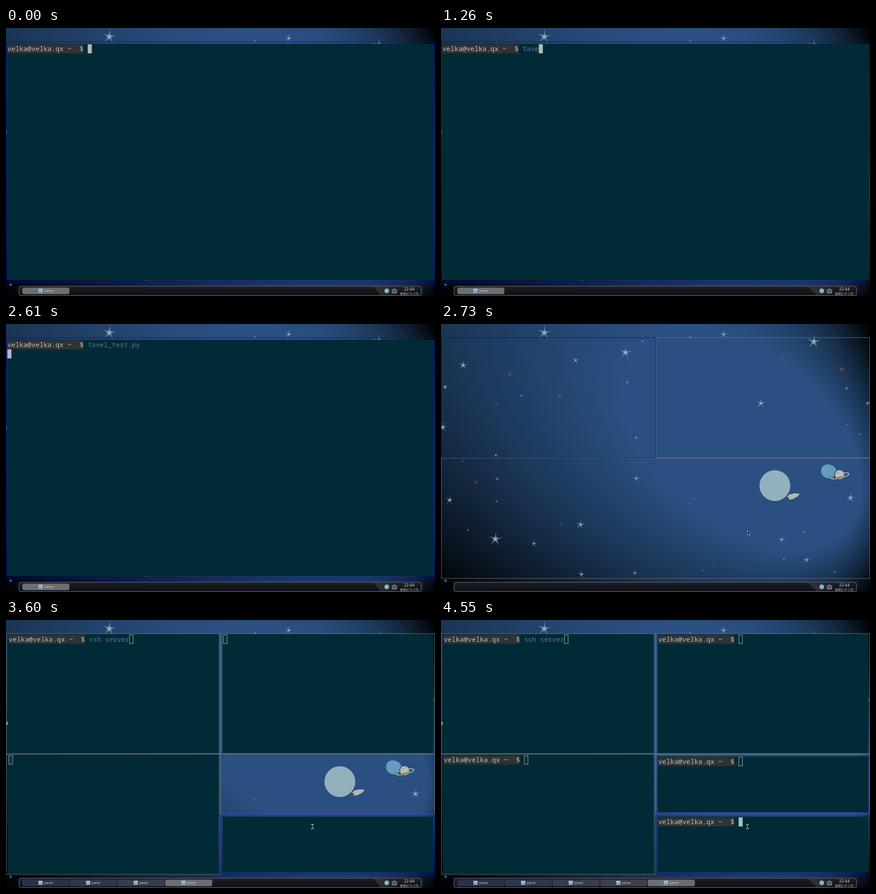
An HTML page for the animation above (9910 ms loop, 947 by 592 pixels).

```html
<!DOCTYPE html>
<html lang="en">
<head>
<meta charset="utf-8">
<title>Tiling desktop</title>
<style>
html, body { margin: 0; width: 100%; height: 100%; overflow: hidden; background: #000; }
svg { display: block; width: 100vw; height: 100vh; }
text { white-space: pre; }
.term { font: 14.78px "Noto Sans Mono", monospace; }
.small { font: 7px "DejaVu Sans", sans-serif; fill: #d0d2d4; }
.clock { font: 8px "DejaVu Sans", sans-serif; fill: #dcdcdc; }
.date { font: 6.2px "Noto Sans CJK SC", "Noto Sans CJK", sans-serif; fill: #c8cacc; }
</style>
</head>
<body>
<svg viewBox="0 0 947 592">
  <defs>
    <radialGradient id="sky" gradientUnits="userSpaceOnUse" cx="-1.81" cy=".58" r="3.24" fx=".81" fy="-.26"
      gradientTransform="translate(670 255) rotate(40) scale(300 185)">
      <stop offset=".309" stop-color="#2a5082"/>
      <stop offset=".6" stop-color="#193250"/>
      <stop offset="1" stop-color="#000204"/>
    </radialGradient>
    <radialGradient id="glow">
      <stop stop-color="#dce8ea" stop-opacity=".7"/>
      <stop offset="1" stop-color="#9db8cc" stop-opacity="0"/>
    </radialGradient>
    <linearGradient id="bar" x2="0" y2="1">
      <stop stop-color="#1b1e25"/>
      <stop offset="1" stop-color="#0d0f14"/>
    </linearGradient>
    <linearGradient id="wedge">
      <stop stop-color="#34363b"/>
      <stop offset=".6" stop-color="#34363b" stop-opacity="0"/>
    </linearGradient>
    <filter id="soft" x="-30%" y="-30%" width="160%" height="160%"><feGaussianBlur stdDeviation=".7"/></filter>
  </defs>
  <rect width="947" height="592" fill="url(#sky)"/>
  <g id="stars"></g>
  <g id="scenery">
    <circle cx="737" cy="357" r="34" fill="#93b0bd"/>
    <path d="M764 382l4-5 12-3 12 1-5 6-11 6-9 1 2-4z" fill="#b4b9b2"/>
    <path d="M839 325q0-14 15-15 14 1 19 13l-8 18q-24 2-26-16z" fill="#679bbd"/>
    <circle cx="880" cy="333" r="12" fill="#233f5e"/>
    <circle cx="880" cy="333" r="10.5" fill="#b9bdb5"/>
    <path d="M873 329l13-4M873 340l15-4" stroke="#8c918e" fill="none"/>
    <g transform="rotate(-13 880 334)" fill="none">
      <path d="M871 331a21 5 0 1 0 18 0" stroke="#1d2c3a" stroke-width="3.600"/>
      <path d="M871 331a21 5 0 1 0 18 0" stroke="#c0c4bc" stroke-width="2"/>
    </g>
  </g>
  <g id="windows"></g>
  <rect x="29" y="570.5" width="888" height="20.5" rx="4" fill="url(#bar)" stroke="#555960" stroke-width="1.6"/>
  <path d="M812 571.5H916V590H828z" fill="url(#wedge)"/>
  <circle cx="840.5" cy="580.5" r="5.3" fill="#86b4cf"/>
  <path d="M852.5 578.5h10v7h-10zM855 576.5h5M854 581h3M858.5 581h3M854 583.5h7" fill="none" stroke="#b9bbbd"/>
  <text class="clock" x="878.7" y="580">22:44</text>
  <text class="date" x="870" y="588.5">星期日 01 六月</text>
  <g id="tasks"></g>
</svg>
<script>
const LOOP = 9910, COL = 8.87, ROW = 20;
const PROMPT = 'velka@velka.qx ~  $';
const COMMAND = 'tavel_test.py ';
const $ = id => document.getElementById(id);

// Stars: x, y, radius
const SHARP = [624,23,9, 550,29,4, 297,80,8, 411,129,5, 431,251,5, 121,290,6, 706,175,11, 895,142,6,
  942,175,7, 431,341,8, 124,342,6, 308,443,11, 205,485,8, 310,553,9, 428,550,7, 752,476,8, 757,519,4,
  802,459,4, 869,548,4, 10,567,6, 924,244,4, 896,223,3, 59,455,4, 445,38,4, 49,303,3, 123,392,4,
  177,158,4, 579,545,3];
const HAZY = [228,19,17, 407,63,15, 823,39,17, 49,91,12, 9,139,8, 4,228,12, 19,389,11, 120,475,17,
  904,384,12, 807,521,9];
const RED = [152,111,8, 262,159,8, 884,100,10, 756,74,6, 78,350,7, 266,442,6, 603,535,4, 189,317,3];
const DOTS = [125,176,1, 275,251,1, 558,386,1, 549,396,1];

function star(x, y, r, fill, extra = '') {
  const points = Array.from({ length: 10 }, (_, i) => {
    const a = i * Math.PI / 5 - 1.47, d = i % 2 ? r * .11 : r;
    return (x + d * Math.cos(a)).toFixed(1) + ',' + (y + d * Math.sin(a)).toFixed(1);
  });
  return `<polygon points="${points.join(' ')}" fill="${fill}" ${extra}/>`;
}
const triples = (list, draw) => {
  let out = '';
  for (let i = 0; i < list.length; i += 3) out += draw(list[i], list[i + 1], list[i + 2]);
  return out;
};
$('stars').innerHTML =
  triples(SHARP, (x, y, r) => star(x, y, r, '#c3d2d4')) +
  triples(RED, (x, y, r) => star(x, y, r, '#c04a35')) +
  triples(DOTS, (x, y, r) => `<circle cx="${x}" cy="${y}" r="${r}" fill="#8fa9b8"/>`) +
  triples(HAZY, (x, y, r) => `<circle cx="${x}" cy="${y}" r="${r * .45}" fill="url(#glow)"/>` +
    star(x, y, r, '#a9bdc8', 'opacity=".8" filter="url(#soft)"'));

// frame and terminal as left, top, right, bottom; text origin
const PANES = {
  full: { frame: [.5, 30.2, 946.5, 562], term: [2, 35, 945, 557], at: [3, 36] },
  topLeft: { frame: [.5, 30, 473, 295.5], term: [4, 31, 469.5, 294], at: [6, 32.5] },
  topRight: { frame: [474, 30, 946.5, 295.5], term: [478, 31, 943, 294], at: [479.5, 32.5] },
  bottom: { frame: [.5, 296.4, 946.5, 562] },
  bottomLeft: { frame: [.5, 296.4, 473, 562], term: [4, 297, 469.5, 561], at: [6, 299] },
  middle: { frame: [474, 296.4, 946.5, 429], term: [478, 301, 943, 424.5], at: [479.5, 302.5] },
  bottomRight: { frame: [474, 430.2, 946.5, 562], term: [478, 434, 943, 557.5], at: [479.5, 436] }
};
const box = ([l, t, r, b], attrs) =>
  `<rect x="${l}" y="${t}" width="${r - l}" height="${b - t}" ${attrs}/>`;

function cursor(x, y, focus) {
  return focus ? box([x, y, x + 9, y + ROW], 'fill="#b2bab5"')
    : box([x + .5, y + .5, x + 8.5, y + 19.5], 'fill="none" stroke="#b2bab5"');
}

// open: terminal shown; text: typed after the prompt (null = no prompt); mark: cursor shown
function pane(name, { focus = false, open = true, text = null, mark = true, entered = false } = {}) {
  const { frame, term, at } = PANES[name];
  let out = '';
  if (open) {
    const [x, y] = at, start = x + 20 * COL;
    out += box(term, 'fill="#002b36"');
    if (text !== null) {
      out += box([x, y, x + 19 * COL, y + ROW], 'fill="#303234"') +
        `<text class="term" x="${x}" y="${y + 15}" fill="#bfc1bd">${PROMPT}</text>` +
        `<text class="term" x="${start}" y="${y + 15}" fill="#64729a">${text}</text>`;
    }
    if (entered) out += cursor(x, y + ROW, focus);
    else if (mark) out += cursor(text === null ? x : start + text.length * COL, y, focus);
  }
  return out + box(frame, `fill="none" stroke="${focus ? '#0808b8' : '#6d7174'}"`);
}

const ARROW = '<path d="M676.5 456v10l2.3-2 1.7 3.5 1.5-.8-1.6-3.3h2.8z" fill="#000" stroke="#ddd" stroke-width=".8"/>';
const BEAM = '<path d="M673 451.5h2.5l1 1 1-1h2.5M676.5 452v8.5M673 461h2.5l1-1 1 1h2.5" fill="none" stroke="#a9b0ae" stroke-width="1.3"/>';

const typing = (count, entered = false) =>
  ({ windows: pane('full', { focus: true, text: COMMAND.slice(0, count), entered }), tasks: 1 });
const split = (first, tasks) => ({
  windows: pane('topRight', { open: false }) + pane('bottom', { open: false }) +
    pane('topLeft', { focus: true, ...first }) + ARROW,
  tasks
});
const tiled = (tasks, right, left, middle, last) => ({
  windows: pane('topLeft', { text: 'ssh server' }) + pane('topRight', { text: right }) +
    pane('bottomLeft', { text: left }) + pane('middle', middle) +
    pane('bottomRight', { focus: true, ...last }) + BEAM,
  tasks
});

const STEPS = [
  [0, typing(0)], [730, typing(1)], [960, typing(2)], [1050, typing(3)], [1260, typing(4)],
  [1420, typing(5)], [1700, typing(6)], [1870, typing(7)], [2080, typing(8)], [2290, typing(14)],
  [2610, typing(14, true)],
  [2730, split({ open: false }, 0)],
  [2790, split({ mark: false }, 1)],
  [2840, split({}, 1)],
  [3600, tiled(4, null, null, { open: false }, { mark: false })],
  [4310, tiled(5, null, '', {}, {})],
  [4470, tiled(5, '', '', {}, {})],
  [4510, tiled(5, '', '', { text: '' }, {})],
  [4550, tiled(5, '', '', { text: '' }, { text: '' })]
];

const IDLE = ['#29324a', '#2c374f', '#373d4a', '#3c404b'];
function taskButtons(count) {
  let out = '';
  for (let i = 0; i < count; i++) {
    const x = 36 + i * 105.1, fill = i === count - 1 ? '#6c6e73' : IDLE[i];
    out += box([x, 573.5, x + 104, 588], `rx="4" fill="${fill}"`) +
      box([x + 35.5, 576.5, x + 45, 585], 'rx=".8" fill="#86abc2"') +
      box([x + 35.5, 576.5, x + 45, 578.5], 'rx=".8" fill="#c3d3da"') +
      `<text class="small" x="${x + 48}" y="583">panel</text>`;
  }
  return out;
}

let shown = null;
const begin = performance.now();
function draw(now) {
  const t = Math.max(0, now - begin) % LOOP;
  const scene = STEPS.findLast(([time]) => time <= t)[1];
  if (scene !== shown) {
    $('windows').innerHTML = scene.windows;
    $('tasks').innerHTML = taskButtons(scene.tasks);
    shown = scene;
  }
  requestAnimationFrame(draw);
}
draw(begin);
</script>
</body>
</html>
```
